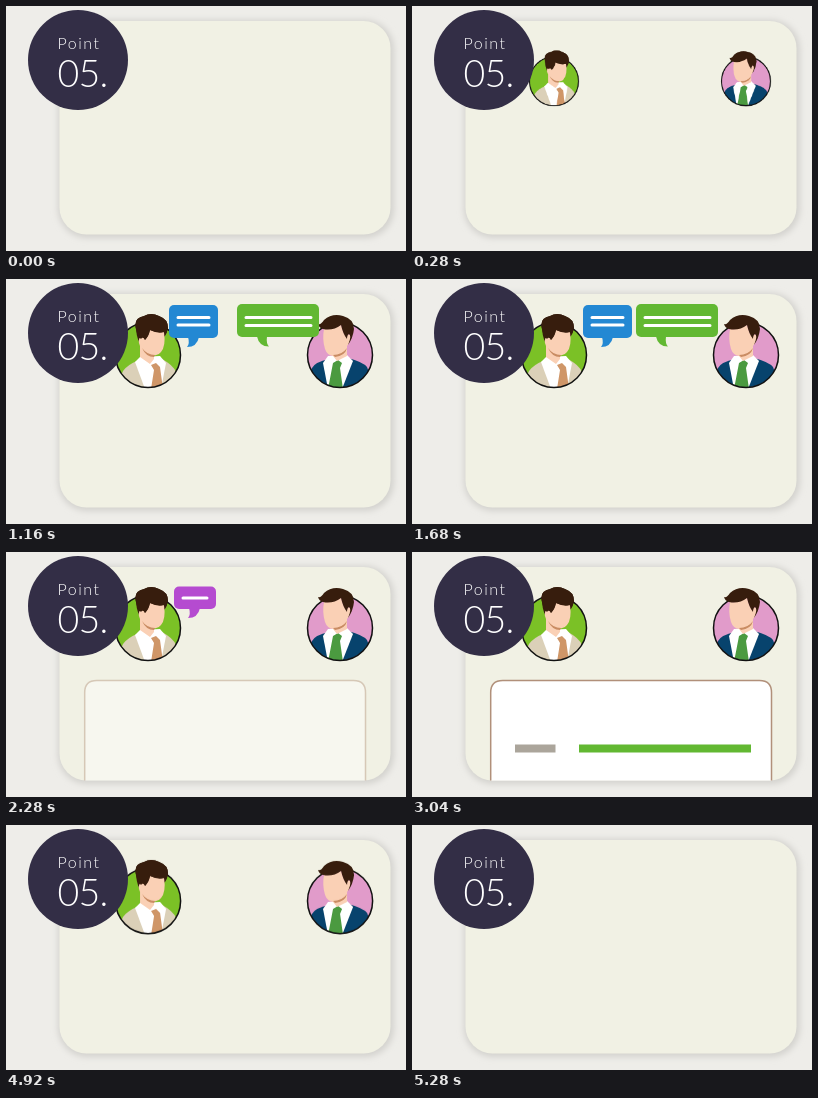
An HTML page for the animation above (5.4 s loop, 400 px wide and 245 px high).

```html
<!DOCTYPE html>
<html lang="en">
<head>
<meta charset="utf-8">
<title>Point 05</title>
<style>
html, body { margin: 0; width: 100%; height: 100%; overflow: hidden; background: #eeede9; }
svg { display: block; width: 100%; height: 100%; }
text { font-family: Lato, "Open Sans", sans-serif; font-weight: 300; fill: #fff; }

.avatar, .pop, .panel, .row, .on, .talk { animation: 5400ms linear infinite; }
.avatar { animation-name: avatar; }
.avatar.left { transform-origin: 142px 73px; }
.avatar.right { transform-origin: 334px 73px; }
.pop {
  animation-name: pop; animation-delay: var(--d); animation-fill-mode: backwards;
  transform-box: fill-box; transform-origin: center;
}
.pop path { stroke: #fff; stroke-width: 3; stroke-linecap: round; }
.on { visibility: hidden; animation-name: on; animation-delay: var(--d); animation-timing-function: step-end; }
.talk { visibility: hidden; animation-timing-function: step-end; }
.first { animation-name: first; }
.second { animation-name: second; }
.reply { animation-name: reply; }
.last { animation-name: last; }
.panel { animation-name: panel; }
.row { animation-name: row; animation-timing-function: step-end; }

.blue { fill: #2388d3; }
.green { fill: #62b832; }
.purple { fill: #b54bd0; }
.grey { fill: #aba59b; }
.hair { fill: #371d0d; }
.skin { fill: #fad0b5; }
.white { fill: #fff; }

@keyframes avatar {
  0%, 1.48% { transform: scale(0); }
  7.41% { transform: scale(1.2); }
  9.63%, 91.11% { transform: scale(1); }
  93.33% { transform: scale(1.2); }
  97.78%, 100% { transform: scale(0); }
}
@keyframes pop {
  0% { transform: scale(0); }
  2.96% { transform: scale(1.15); }
  4.44%, 29.9% { transform: scale(1); }
  30%, 100% { transform: scale(0); }
}
@keyframes on {
  0% { visibility: visible; }
  36%, 100% { visibility: hidden; }
}
@keyframes first {
  0% { visibility: hidden; }
  11.85% { visibility: visible; }
  22.96%, 100% { visibility: hidden; }
}
@keyframes second {
  0% { visibility: hidden; }
  22.96% { visibility: visible; }
  32.59%, 100% { visibility: hidden; }
}
@keyframes reply {
  0% { visibility: hidden; }
  34.81% { visibility: visible; }
  41.48%, 100% { visibility: hidden; }
}
@keyframes last {
  0% { visibility: hidden; }
  37.04% { visibility: visible; }
  48.15%, 100% { visibility: hidden; }
}
@keyframes panel {
  0% { opacity: 0; }
  34.81% { opacity: 0; animation-timing-function: ease-in-out; }
  51.11%, 91.1% { opacity: 1; }
  91.11%, 100% { opacity: 0; }
}
@keyframes row {
  0% { transform: translateY(49px); }
  66.66% { transform: translateY(5px); }
  70.37% { transform: translateY(2px); }
  72.59%, 100% { transform: none; }
}
</style>
</head>
<body>
<svg viewBox="0 0 400 245">
  <defs>
    <filter id="soft" x="-10%" y="-10%" width="120%" height="120%"><feGaussianBlur stdDeviation="3"/></filter>
    <clipPath id="clipL"><path d="M100 20H185V76H174.5A32.5 32.5 0 0 1 109.5 76H100Z"/></clipPath>
    <clipPath id="clipR"><path d="M290 20H377V76H366.5A32.5 32.5 0 0 1 301.5 76H290Z"/></clipPath>
    <path id="tailL" d="M0 0Q2 7-1 10Q9 10 11 0Z"/>
    <path id="tailR" d="M0 0Q2 10 12 10Q9 7 10 0Z"/>
  </defs>

  <rect width="400" height="245" fill="#eeede9"/>
  <rect x="52" y="14" width="336" height="218" rx="29" fill="#d3d2ce" filter="url(#soft)"/>
  <rect x="53.5" y="15" width="331" height="213.5" rx="27" fill="#f1f1e4"/>

  <g class="panel">
    <path d="M78.7 228.5V140.5Q78.7 128.5 90.7 128.5H347.5Q359.5 128.5 359.5 140.5V228.5" fill="#fff" stroke="#b1907a" stroke-width="1.5"/>
    <g class="row">
      <g class="on" style="--d:3040ms">
        <rect class="grey" x="103" y="143.5" width="40.5" height="8"/>
        <rect class="green" x="167" y="143.5" width="172" height="8"/>
      </g>
      <rect class="green on" style="--d:3160ms" x="167" y="157" width="172" height="8"/>
    </g>
    <g class="on" style="--d:4040ms">
      <rect class="grey" x="103" y="170.5" width="40.5" height="8"/>
      <rect class="green" x="167" y="170.5" width="172" height="8"/>
    </g>
    <rect class="green on" style="--d:4160ms" x="167" y="184" width="172" height="8"/>
    <g class="on" style="--d:4480ms">
      <rect class="grey" x="103" y="208" width="40.5" height="8"/>
      <rect class="green" x="167" y="208" width="51" height="8"/>
    </g>
  </g>

  <g class="avatar left">
    <circle cx="142" cy="76" r="32.5" fill="#7bc126"/>
    <g clip-path="url(#clipL)">
      <path fill="#dbd0b8" d="M109 110L117 92Q121 86 133 81L156 80Q167 86 170 93V110Z"/>
      <path class="white" d="M134 78L129 83L139 110H155L160 84L154 77Z"/>
      <path fill="#cf9668" d="M145 86L150 84L154 88L157 110H145L148 91Z"/>
      <path class="hair" d="M130 50Q127 39 138 37Q145 33 153 37Q162 40 162 49Q161 54 159 57L137 69Q131 63 130 50Z"/>
      <path class="skin" d="M135 58Q138 57 139 61Q143 56 144 51Q152 55 158 53Q160 67 155 73Q152 77 148 76V80L144 85L134 78V67Q131 60 135 58Z"/>
      <path fill="#c98c63" d="M136 69Q141 76 149 76L148 78Q140 78 136 69Z"/>
    </g>
    <circle cx="142" cy="76" r="32.5" fill="none" stroke="#111" stroke-width="1.5"/>
    <path class="hair" d="M130 50Q127 39 138 37Q145 33 153 37Q162 40 162 49Q161 54 159 56Q159 53 157 53Q151 54 144 51Q143 57 139 61Q137 57 135 60Q131 57 130 50Z"/>
  </g>

  <g class="avatar right">
    <circle cx="334" cy="76" r="32.5" fill="#e19bca"/>
    <g clip-path="url(#clipR)">
      <path fill="#07436d" d="M300 110L306 89Q309 83 323 80L342 79Q357 83 361 88L369 110Z"/>
      <path class="white" d="M322 77L317 84L322 110H336L347 82L341 76Z"/>
      <path fill="#4b9a40" d="M327 84L332 81L336 84L334 89L337 110H322Z"/>
      <path class="skin" d="M318 50Q327 51 335 46Q337 55 341 59Q341 54 344 56Q346 61 341 67V77L331 82L327 77Q321 76 319 70Q316 60 318 50Z"/>
      <path fill="#c98c63" d="M327 76Q336 76 341 69Q339 77 329 78Z"/>
    </g>
    <circle cx="334" cy="76" r="32.5" fill="none" stroke="#111" stroke-width="1.5"/>
    <path class="hair" d="M312 45Q315 46 318 41Q326 34 337 37Q348 40 348 50Q347 59 342 66Q346 57 343 55Q341 56 341 60Q337 55 335 46Q327 52 317 50Q313 49 312 45Z"/>
  </g>

  <g class="talk first">
    <g class="pop blue" style="--d:680ms">
      <rect x="163" y="26" width="49" height="33" rx="5"/>
      <use href="#tailL" x="182" y="58"/>
      <path d="M172 38.5h31m-31 7.5h31"/>
    </g>
    <g class="pop green" style="--d:920ms">
      <rect x="231" y="25" width="82" height="33" rx="5"/>
      <use href="#tailR" x="251" y="57.5"/>
      <path d="M240 38.5h65m-65 8h65"/>
    </g>
  </g>
  <g class="talk second">
    <g class="pop blue" style="--d:1240ms">
      <rect x="171" y="26" width="49" height="33" rx="5"/>
      <use href="#tailL" x="190" y="58"/>
      <path d="M180 38.5h31m-31 7.5h31"/>
    </g>
    <g class="pop green" style="--d:1440ms">
      <rect x="224" y="25" width="82" height="33" rx="5"/>
      <use href="#tailR" x="244" y="57.5"/>
      <path d="M233 38.5h65m-65 8h65"/>
    </g>
  </g>
  <g class="talk reply">
    <g class="pop green" style="--d:1880ms">
      <rect x="224" y="25" width="82" height="33" rx="5"/>
      <use href="#tailR" x="244" y="57.5"/>
      <path d="M233 38.5h65m-65 8h65"/>
    </g>
  </g>
  <g class="talk last">
    <g class="pop purple" style="--d:2000ms">
      <rect x="168" y="34.5" width="42" height="22.5" rx="5"/>
      <use href="#tailL" x="183" y="56"/>
      <path d="M177 46h24"/>
    </g>
  </g>

  <circle cx="72" cy="54" r="50" fill="#332e46"/>
  <text x="51.5" y="43" font-size="16" letter-spacing="1.5">Point</text>
  <text x="51.5" y="81" font-size="37.5" letter-spacing="-0.8">05.</text>
</svg>
</body>
</html>
```
